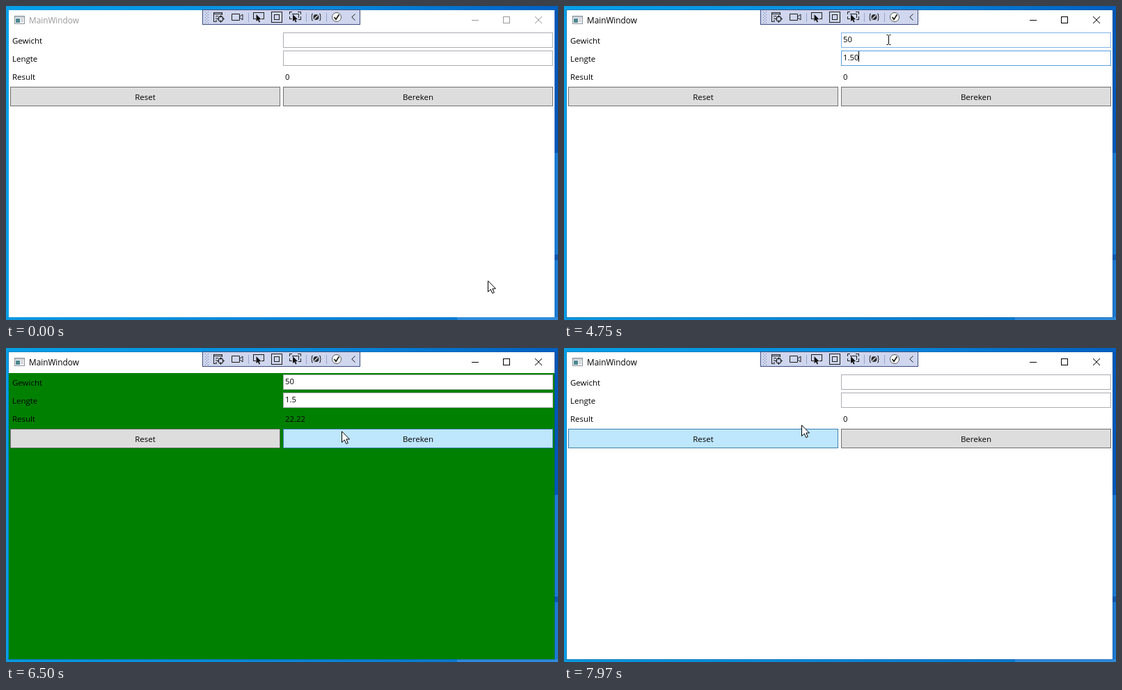
An HTML page that plays this animation: 793x451 px, repeating every 8000 ms.

```html
<!DOCTYPE html>
<html lang="nl">
<head>
<meta charset="utf-8">
<title>MainWindow</title>
<style>
  html, body { margin: 0; width: 100%; height: 100%; overflow: hidden; background: #fff; }
  svg { display: block; width: 793px; height: 451px; }
  text { font: 11.5px "Open Sans", "Noto Sans", sans-serif; fill: #000; white-space: pre; }
  .title { font-size: 11.8px; }
  .num { font-size: 11.3px; }
  .mid { text-anchor: middle; }
  .line { fill: none; stroke: #1e1e1e; }
  .sharp { shape-rendering: crispEdges; }
</style>
</head>
<body>
<svg viewBox="0 0 793 451">
  <defs>
    <linearGradient id="sky">
      <stop offset="0" stop-color="#069fe8"/>
      <stop offset=".5" stop-color="#088fdf"/>
      <stop offset="1" stop-color="#0060c2"/>
    </linearGradient>
    <linearGradient id="floor">
      <stop offset="0" stop-color="#0a98e0"/>
      <stop offset="1" stop-color="#0a74cc"/>
    </linearGradient>
    <path id="pick" d="M0 0V10L2.4 8 4 11.500 5.600 10.700 4 7.300H7.200Z"/>
  </defs>

  <g class="sharp">
    <rect width="793" height="451" fill="url(#sky)"/>
    <rect y="447" width="793" height="4" fill="url(#floor)"/>
    <rect x="648" y="447" width="145" height="4" fill="#2f8bdb"/>
    <rect x="788" y="6" width="5" height="205" fill="#0058b8"/>
    <rect x="788" y="211" width="5" height="146" fill="#1b7bd2"/>
    <rect x="788" y="357" width="5" height="8" fill="#0a58b2"/>
    <rect x="788" y="365" width="5" height="82" fill="#1c7ad2"/>
    <rect id="edge" x="3.5" y="5.500" width="785" height="442" fill="none" stroke="#003c78" stroke-opacity=".3"/>
    <rect x="4" y="6" width="784" height="441" fill="#fff"/>
    <rect id="client" x="4" y="36" width="784" height="411" fill="#fff"/>
  </g>

  <g class="sharp">
    <rect x="12.500" y="14.500" width="14" height="11" fill="#f6f8fa" stroke="#8b9299"/>
    <rect x="13" y="15" width="13" height="2" fill="#c3cad1"/>
    <rect x="14" y="18" width="6" height="6" fill="#4d8790"/>
    <path d="M21 18.500h4M21 20.500h4M21 22.500h4" stroke="#b4bac0"/>
  </g>
  <text id="title" class="title" x="33" y="24.500">MainWindow</text>
  <g id="controls" fill="none">
    <path class="sharp" d="M669 20.500h10M714.500 15.500h9v9h-9z"/>
    <path d="M760 15l10 10M770 15l-10 10"/>
  </g>

  <g id="toolbar">
    <rect class="sharp" x="282.500" y="5.500" width="226" height="21" fill="#cfd6ee" stroke="#3f4e80"/>
    <path class="sharp" d="M286.500 8v17M290.500 8v17M288.500 10v15" stroke="#67759f" stroke-dasharray="1 3" fill="none"/>
    <path class="sharp" d="M348.500 10v13M431.500 10v13M460.500 10v13" stroke="#98a5cc"/>
    <path class="line sharp" d="M303 22.500h-4.500v-13h12v3M298 11.500h13M301 14.500h4M301 17.500h2M301 20.500h2"/>
    <circle class="line" cx="308.500" cy="18.500" r="3.500" stroke-width="1.300"/>
    <path class="line" d="M308.500 13v3.500M308.500 20.500v3.500M303 18.500h3.500M310.500 18.500h3.500"/>
    <path class="line" d="M324.500 11.500h11v9h-11zM336 15l4-3v8l-4-3"/>
    <path class="line sharp" d="M359 18.500h-3.500v-9h15v9h-4"/>
    <use href="#pick" x="359.500" y="12" fill="#111"/>
    <path class="line sharp" d="M381.500 8.500h15v15h-15zM385.500 12.500h7v7h-7z"/>
    <path class="line sharp" d="M407 12v-3.500h4M419 8.500h4v3.500M423.500 15v4h-4M411 18.500h-3.500v-4M411 11.500h9v5"/>
    <use href="#pick" x="412" y="12" fill="#111"/>
    <path class="line" d="M441 11q-2.500 0-1.500 3 .3 1.500-1 2 1.300.5 1 2-1 3 1.500 3M450 11q2.500 0 1.500 3-.3 1.500 1 2-1.300.5-1 2 1 3-1.500 3"/>
    <circle cx="445.500" cy="16" r="4" fill="#2b2b2b"/>
    <path d="M443 18.500l5-5" stroke="#e5eaf7" stroke-width="1.300"/>
    <circle cx="475" cy="16" r="6.500" fill="#f8faf6" stroke="#565b5c"/>
    <path class="line" d="M471.500 16l2.500 3.300 4.500-7" stroke-width="1.700"/>
    <path class="line" d="M501.500 11.500l-4.700 4.500 4.700 4.500"/>
  </g>

  <text x="9" y="54">Gewicht</text>
  <text x="9" y="80">Lengte</text>
  <text x="9" y="106">Result</text>
  <g class="sharp">
    <rect id="box0" x="398.500" y="38.500" width="387" height="21" fill="#fff"/>
    <rect id="box1" x="398.500" y="64.500" width="387" height="21" fill="#fff"/>
    <rect id="reset" x="6.500" y="116.500" width="387" height="27"/>
    <rect id="calc" x="398.500" y="116.500" width="387" height="27"/>
  </g>
  <text id="weight" class="num" x="401" y="52"></text>
  <text id="height" class="num" x="401" y="78"></text>
  <text id="result" class="num" x="401" y="106"></text>
  <text class="mid" x="200" y="135">Reset</text>
  <text class="mid" x="592" y="135">Bereken</text>
  <rect id="caret" class="sharp" width="1" height="15"/>

  <circle id="click" r="12" fill="#ece400" fill-opacity=".6"/>
  <path id="arrow" d="M.5.8V16.500L4.300 13 6.800 18.600 9.300 17.500 6.900 12H11.500Z" fill="#fff" stroke="#000"/>
  <path id="beam" d="M-2.500-7.500h2l1 1 1-1h2M.5-6.500v12M-2.500 6.500h2l1-1 1 1h2" fill="none" stroke="#000"/>
</svg>

<script>
const LOOP = 8000;
const ui = {};
for (const el of document.querySelectorAll('svg [id]')) ui[el.id] = el;

// Value changes: [time, value]
const weightSteps = [[0, ''], [1760, '5'], [1950, '50'], [7620, '']];
const heightSteps = [[0, ''], [2680, '1'], [3010, '1.'], [3360, '1.6'], [3760, '1.'],
  [4090, '1.5'], [4220, '1.50'], [5490, '1.5'], [7620, '']];
const focusSteps = [[0, -1], [1010, 0], [2350, 1], [5490, -1]];

// Pointer moves: first step, last step, steps, bend x, y, end x, y
const moves = [
  [70, 662, 9, 600, 230, 488, 6],
  [736, 810, 2, 478, 24, 466, 47],
  [4750, 5350, 10, 474, 85, 488, 127],
  [6100, 6300, 3, 489, 126, 490, 124],
  [6500, 6500, 1, 486, 121, 482, 119],
  [6568, 6840, 5, 405, 106, 329, 127],
  [7970, 7970, 1, 335, 118, 341, 110]
];
const clicks = [[940, 1150], [5350, 5490], [7430, 7560]];

const during = (t, a, b) => t >= a && t < b;
const at = (steps, t) => steps.findLast(s => s[0] <= t)[1];
const show = (el, on) => el.setAttribute('visibility', on ? 'visible' : 'hidden');
const place = (el, x, y) => el.setAttribute('transform', `translate(${x} ${y})`);
const bend = (a, b, c, p) => (1 - p) ** 2 * a + 2 * p * (1 - p) * b + p * p * c;

function pointer(t) {
  let x = 692, y = 394;
  for (const [start, end, count, bx, by, ex, ey] of moves) {
    if (t < start) break;
    const gap = (end - start) / (count - 1) || 1;
    const k = Math.min(1, (Math.floor((t - start) / gap + 1e-6) + 1) / count);
    const p = count > 5 ? k * k * (3 - 2 * k) : k;
    x = Math.round(bend(x, bx, ex, p));
    y = Math.round(bend(y, by, ey, p));
  }
  return [x, y];
}

function paintButton(el, hover, pressed) {
  el.setAttribute('fill', pressed ? '#c4e5f6' : hover ? '#bee6fd' : '#ddd');
  el.setAttribute('stroke', pressed ? '#2c628b' : hover ? '#3c7fb1' : '#707070');
}

function render(t) {
  const [x, y] = pointer(t);
  const active = t >= 940;
  const solved = during(t, 5490, 7620);
  const focus = at(focusSteps, t);
  const values = [at(weightSteps, t), at(heightSteps, t)];
  const inRow = top => x >= 398 && x < 786 && y >= top && y < top + 22;
  const over = [inRow(38), inRow(64)];

  ui.client.setAttribute('fill', solved ? '#008000' : '#fff');
  ui.title.style.fill = active ? '#000' : '#999';
  ui.controls.setAttribute('stroke', active ? '#000' : '#999');
  show(ui.edge, active);

  ui.weight.textContent = values[0];
  ui.height.textContent = values[1];
  ui.result.textContent = solved ? '22.22' : '0';
  [ui.box0, ui.box1].forEach((box, i) =>
    box.setAttribute('stroke', focus === i ? '#569de5' : over[i] ? '#7eb4ea' : '#abadb3'));

  const onButtons = y >= 110 && y < 144;
  paintButton(ui.reset, onButtons && x < 394, during(t, 7430, 7620));
  paintButton(ui.calc, onButtons && x >= 398 && x < 786, false);

  show(ui.caret, focus >= 0 && !during(t, 1560, 1760));
  if (focus >= 0) {
    const field = focus ? ui.height : ui.weight;
    const width = values[focus] ? field.getComputedTextLength() : 0;
    ui.caret.setAttribute('x', Math.round(401 + width));
    ui.caret.setAttribute('y', focus ? 65 : 39);
  }

  const typing = over[0] || over[1];
  show(ui.arrow, !typing);
  show(ui.beam, typing);
  show(ui.click, clicks.some(c => during(t, ...c)));
  for (const el of [ui.arrow, ui.beam, ui.click]) place(el, x, y);
}

const begin = performance.now();
function tick() {
  render((performance.now() - begin) % LOOP);
  requestAnimationFrame(tick);
}
tick();
</script>
</body>
</html>
```
